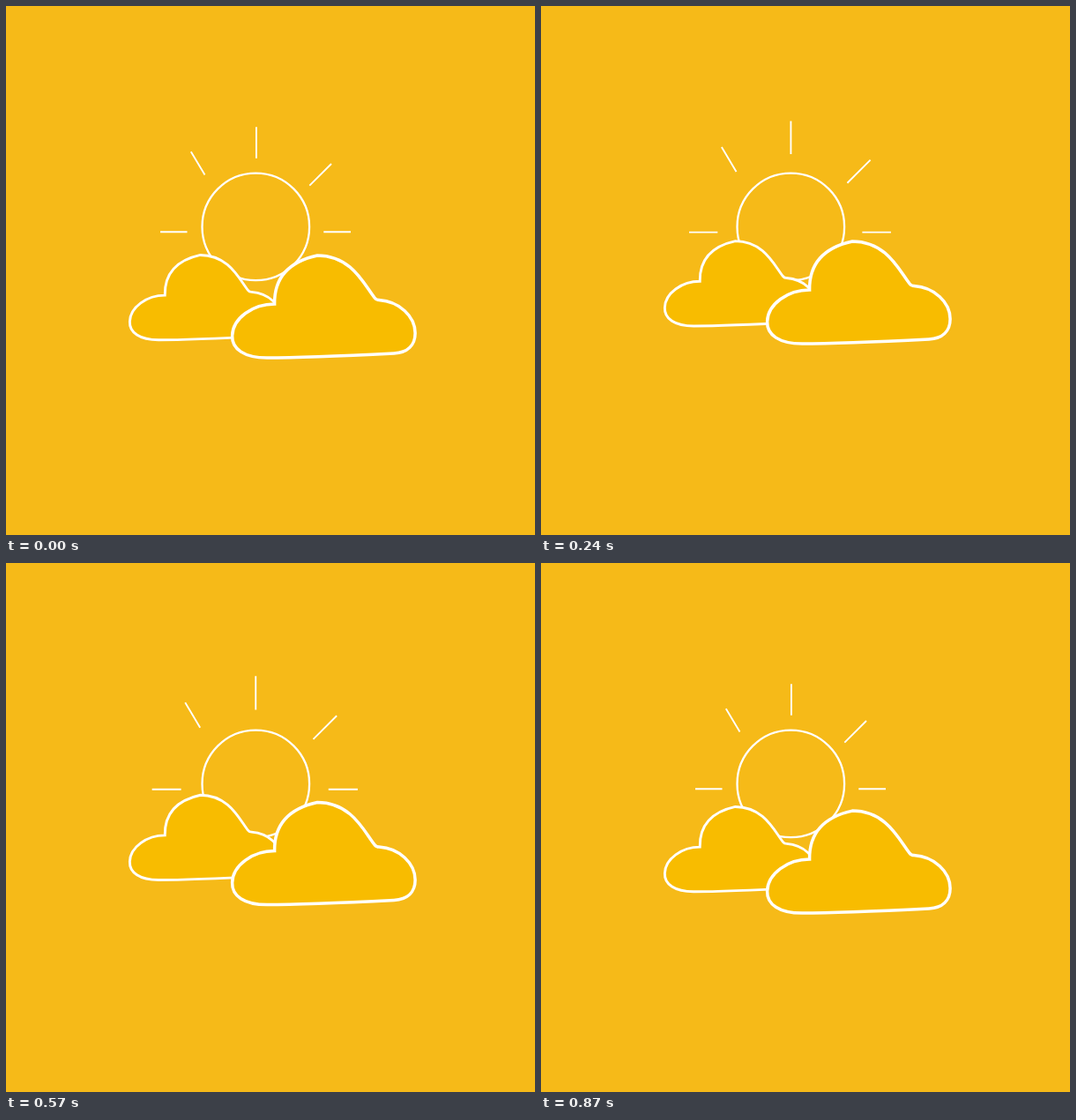
These frames come from a looping animation (600 px wide and 600 px high, 900 ms). An HTML page with a canvas:

```html
<!DOCTYPE html>
<html lang="en">
<head>
<meta charset="utf-8">
<title>Sun and clouds</title>
<style>
  html, body { margin: 0; width: 100%; height: 100%; overflow: hidden; background: #f6ba18; }
  canvas { display: block; }
</style>
</head>
<body>
<canvas id="stage" width="600" height="600"></canvas>
<script>
const ctx = document.getElementById('stage').getContext('2d');
const SKY = '#f6ba18', CLOUD = '#f8bc00', LINE = '#fff';
const STEP = 30, STEPS = 30;

// Outline relative to the notch left of the dome.
const cloudPath = new Path2D(
  'M0 0 C-.5 -30 16.5 -48 48.5 -55 C87.5 -55 101.5 -22 113.5 -7 ' +
  'Q115.5 -4.5 118.5 -4.5 C141.5 -3 159.5 14 159.5 33 ' +
  'C159.5 47 150.5 55 135.5 56 C95.5 58 35.5 61 -8.5 61 ' +
  'C-34.5 61 -48.5 51 -48 36 C-47.5 16 -24.5 0 0 0 Z');

const rays = [
  [175, 256.3, 205.5, 256.3],
  [209.8, 165.2, 225.5, 191.5],
  [283.9, 137.3, 283.9, 172.7],
  [344.3, 203.6, 369, 179],
  [360.3, 256.3, 391, 256.3]
];

const lerp = (a, b, t) => a + (b - a) * t;
const clamp01 = t => Math.min(1, Math.max(0, t));
const ease = t => (1 - Math.cos(Math.PI * t)) / 2;
const progress = (n, start, end) => clamp01((n - start) / (end - start));

const frontLift = n => n < 10
  ? lerp(0, -20, progress(n, 0, 10))
  : lerp(-20, 0, progress(n, 10, 31));

const backLift = n => n < 13
  ? lerp(0, -25.1, ease(progress(n, 1, 13)))
  : lerp(-25.1, -6, ease(progress(n, 13, 29)));

const raySpread = n => 1 + 0.112 * (n < 15 ? progress(n, 0, 15) : 1 - progress(n, 15, 29));

function drawRays(scale) {
  const cx = 292, cy = 251;
  ctx.lineWidth = 1.9;
  ctx.beginPath();
  for (const [x1, y1, x2, y2] of rays) {
    ctx.moveTo(lerp(cx, x1, scale), lerp(cy, y1, scale));
    ctx.lineTo(lerp(cx, x2, scale), lerp(cy, y2, scale));
  }
  ctx.stroke();
}

function drawSun() {
  ctx.lineWidth = 2.3;
  ctx.beginPath();
  ctx.arc(283.3, 250.4, 60.8, 0, Math.PI * 2);
  ctx.stroke();
}

function drawCloud(x, y, scale) {
  ctx.save();
  ctx.translate(x, y);
  ctx.scale(scale, scale);
  ctx.lineWidth = 3.5;
  ctx.fillStyle = CLOUD;
  ctx.fill(cloudPath);
  ctx.stroke(cloudPath);
  ctx.restore();
}

function draw() {
  const n = Math.floor(performance.now() / STEP) % STEPS;
  ctx.fillStyle = SKY;
  ctx.fillRect(0, 0, 600, 600);
  ctx.strokeStyle = LINE;
  drawRays(raySpread(n));
  drawSun();
  drawCloud(180.2, 328.1 + backLift(n), 0.83);
  drawCloud(304.6, 338 + frontLift(n), 1);
  requestAnimationFrame(draw);
}
draw();
</script>
</body>
</html>
```
